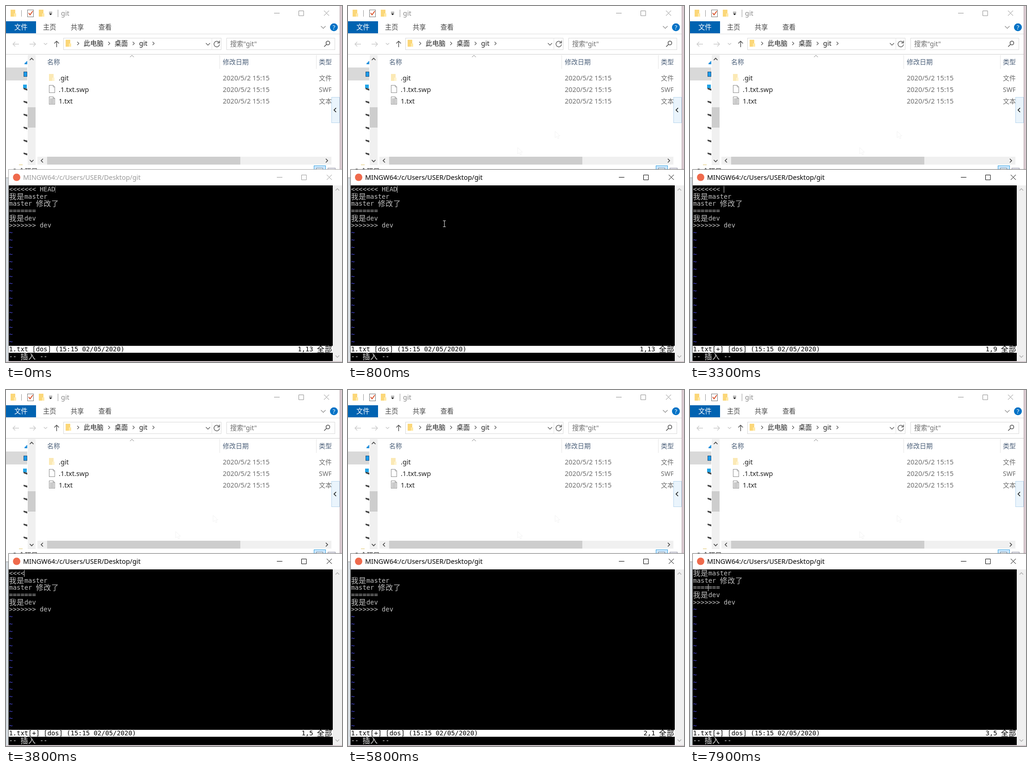
Write an HTML page with a canvas that moves like this. It is 727 px wide and 770 px high and loops after 8 s.

```html
<!DOCTYPE html>
<html lang="zh-CN">
<head>
<meta charset="utf-8">
<title>Resolving a merge conflict</title>
<style>
html, body { margin: 0; width: 100%; height: 100%; overflow: hidden; background: #fff; }
canvas { display: block; }
</style>
</head>
<body>
<canvas id="stage" width="727" height="770"></canvas>
<script>
const ctx = document.getElementById("stage").getContext("2d");
const LOOP = 8000;
const UI_FONT = "'Noto Sans', 'Noto Sans CJK SC', 'Noto Sans CJK', sans-serif";
const MONO_FONT = "'DejaVu Sans Mono', 'Noto Sans CJK SC', 'Noto Sans CJK', monospace";
const CELL_W = 8.33, CELL_H = 15.73, TERM_X = 6.4, TERM_Y = 388.8;

function rect(x, y, w, h, fill, border) {
  ctx.fillStyle = fill;
  ctx.fillRect(x, y, w, h);
  if (border) {
    ctx.strokeStyle = border;
    ctx.lineWidth = 1;
    ctx.strokeRect(x + .5, y + .5, w - 1, h - 1);
  }
}
function line(path, color, width = 1) {
  ctx.strokeStyle = color;
  ctx.lineWidth = width;
  ctx.stroke(new Path2D(path));
}
function shape(path, color) {
  ctx.fillStyle = color;
  ctx.fill(new Path2D(path));
}
function disc(x, y, r, color) {
  ctx.fillStyle = color;
  ctx.beginPath();
  ctx.arc(x, y, r, 0, 7);
  ctx.fill();
}
function text(str, x, middle, color, size = 14.5) {
  ctx.font = `${size}px ${UI_FONT}`;
  ctx.fillStyle = color;
  ctx.fillText(str, x, middle + 5);
}
function chevron(x, y, dir, size, color, width = 1.4) {
  const half = size / 2;
  const [dx, dy] = { up: [0, -1], down: [0, 1], left: [-1, 0], right: [1, 0] }[dir];
  const tipX = x + dx * half, tipY = y + dy * half;
  line(`M${tipX - dx * size - dy * size} ${tipY - dy * size - dx * size}L${tipX} ${tipY}` +
       `L${tipX - dx * size + dy * size} ${tipY - dy * size + dx * size}`, color, width);
}
function folder(x, y, light) {
  rect(x, y, 10, 15, light ? "#fbe9b5" : "#fbd779");
  rect(x + 7, y + 8, 5, 7, light ? "#fff3cf" : "#ffe9a6");
}
function page(x, y, lined) {
  rect(x, y, 13, 17, "#fff", "#8c8c8c");
  shape(`M${x + 9} ${y}h4v4z`, "#fff");
  line(`M${x + 9} ${y + .5}v3.5h3.5z`, "#8c8c8c");
  if (lined) for (let i = 4; i < 15; i += 2) line(`M${x + 2} ${y + i + .5}h9`, "#999");
}
function windowButtons(x, y, color) {
  line(`M${x} ${y + .5}h12M${x + 53.5} ${y - 4.5}h10.5v10.5h-10.5z`, color);
  line(`M${x + 108} ${y - 5}l11 11m0 -11l-11 11`, color);
}

function drawExplorerTop() {
  folder(10, 8);
  rect(33, 9, 1, 14, "#999");
  rect(46, 8, 14, 16, "#fff", "#777");
  line("M49 15l3 4l6 -8", "#d9522c", 2);
  folder(71, 8);
  rect(93, 13, 7, 1, "#333");
  shape("M93 16h7l-3.5 4z", "#222");
  rect(112, 8, 1, 16, "#999");
  text("git", 119, 16, "#8a8a8a");
  windowButtons(580, 15, "#8f8f8f");

  rect(0, 33, 65, 26, "#0063b1");
  text("文件", 18, 46, "#fff", 14.3);
  ["主页", "共享", "查看"].forEach((tab, i) => text(tab, 80 + i * 60, 46, "#444", 14.3));
  chevron(686.5, 46, "down", 5, "#888", 1.2);
  disc(709.5, 46, 8.5, "#0072c6");
  ctx.textAlign = "center";
  text("?", 709.5, 46, "#fff", 13);
  ctx.textAlign = "left";
  rect(0, 60, 722, 1, "#dcdcdc");

  line("M28 82.5h-13m5 -5l-5 5l5 5M51 82.5h13m-5 -5l5 5l-5 5", "#cbcbcb", 1.3);
  chevron(85.5, 82, "down", 3.5, "#c4c4c4", 1.2);
  line("M109.5 89v-13m-5 5l5 -5l5 5", "#555", 1.5);
  rect(124, 69, 342, 26, "#fff", "#d9d9d9");
  rect(445, 69, 1, 26, "#e2e2e2");
  folder(129, 73);
  for (const x of [156, 223, 276, 319]) chevron(x, 81, "right", 3.5, "#555", 1.2);
  text("此电脑", 168, 81, "#222", 14.3);
  text("桌面", 235, 81, "#222", 14.3);
  text("git", 288, 81, "#222");
  chevron(437, 82.5, "down", 4.5, "#666");
  line("M461 79a6 6 0 1 0 1 4M462 75v5h-5", "#666", 1.5);
  rect(477, 69, 235, 26, "#fff", "#d9d9d9");
  text("搜索\"git\"", 485, 82, "#707070", 14.3);
  line("M692.5 80a4 4 0 1 1 8 0a4 4 0 1 1 -8 0M693.5 83l-5 5", "#555", 1.6);
  rect(0, 104, 722, 1, "#cfcfcf");
}

function drawNavigation() {
  rect(0, 133, 46, 28, "#d9d9d9");
  shape("M40 126q0 -4 3 -4q1 -3 3 -3v7z", "#2490dc");
  rect(38, 142, 8, 11, "#1c9bea", "#24507a");
  rect(37, 170, 8, 8, "#22a5e8");
  for (const y of [177, 205, 233, 261, 289, 317])
    shape(`M38 ${y}l8 2v4l-8 -3z`, "#444");
  rect(28, 343, 8, 1, "#e0c66a");
  rect(47, 106, 17, 238, "#f0f0f0");
  rect(47, 219, 17, 44, "#cdcdcd");
  chevron(55.5, 115, "up", 4, "#444", 1.6);
  chevron(55.5, 335, "down", 4, "#444", 1.6);
}

function drawFileList() {
  chevron(272.5, 108.5, "up", 4, "#777", 1);
  rect(462, 106, 1, 30, "#e5e5e5");
  rect(671, 106, 1, 30, "#e5e5e5");
  text("名称", 89, 121, "#4c607a", 14);
  text("修改日期", 469, 121, "#4c607a", 14);
  folder(93, 147, true);
  page(93, 171);
  page(93, 196, true);

  ctx.save();
  ctx.beginPath();
  ctx.rect(0, 106, 704, 220);
  ctx.clip();
  text("类型", 677, 121, "#4c607a", 14);
  [[".git", "文件夹"], [".1.txt.swp", "SWP 文件"], ["1.txt", "文本文档"]].forEach(([name, type], i) => {
    const y = 156 + i * 25;
    text(name, 114, y, "#222");
    text("2020/5/2 15:15", 469, y, "#6d6d6d");
    text(type, 677, y, "#6d6d6d", 14);
  });
  ctx.restore();

  rect(704, 197, 18, 56, "#eaf4fc", "#b7d6ee");
  chevron(712, 225, "left", 4.5, "#111", 1.5);
  rect(68, 326, 636, 17, "#f0f0f0");
  rect(89, 326, 418, 17, "#cdcdcd");
  chevron(78, 334.5, "left", 4, "#444", 1.6);
  chevron(694, 334.5, "right", 4, "#444", 1.6);
  text("3 个项目", 15, 357, "#333", 14);
  rect(666, 345, 26, 20, "#cce8ff", "#3aa0dc");
  rect(671, 350, 15, 8, "#e8f2f8", "#789");
  rect(696, 350, 17, 8, "#e8e8ee", "#99a");
}

const arrowPath = (x, y) => `M${x} ${y}v14l3.5 -3l2.5 5l2.5 -1l-2.5 -5h4.5z`;

function drawDesktop() {
  rect(0, 0, 727, 770, "#fff");
  rect(722, 0, 1, 353, "#b3a0a8");
  rect(723, 0, 4, 353, "#dccdd3");
  rect(0, 371, 5, 399, "#d5dbe0");
  rect(0, 371, 5, 1, "#9a9a9a");
}

// Writes on the character grid; wide characters take two cells.
function write(str, row, col, color) {
  ctx.fillStyle = color;
  for (const ch of str) {
    const wide = ch > "\u2e80";
    ctx.font = `${wide ? 16 : 13.84}px ${MONO_FONT}`;
    ctx.fillText(ch, TERM_X + col * CELL_W, TERM_Y + row * CELL_H + (wide ? 13 : 12));
    col += wide ? 2 : 1;
  }
}

// [time, caret row, caret column, caret hidden]
const EDITS = [
  [0, 0, 12], [1300, 0, 12, 1], [1800, 0, 12], [2300, 0, 12, 1], [2800, 0, 12],
  [2900, 0, 11], [3000, 0, 10], [3100, 0, 9], [3300, 0, 8], [3400, 0, 7], [3500, 0, 6],
  [3600, 0, 5], [3800, 0, 4], [3900, 0, 3], [4100, 0, 2], [4200, 0, 1], [4400, 0, 0],
  [4900, 0, 0, 1], [5300, 1, 0], [5800, 1, 0, 1], [5900, 0, 0], [6400, 1, 0],
  [6800, 1, 0, 1], [7100, 2, 0], [7500, 2, 1], [7700, 2, 2], [7800, 2, 3], [7900, 2, 4]
];
// [time, x, y]
const POINTER = [
  [200, 448, 271], [300, 367, 306], [400, 300, 350], [500, 255, 402], [600, 228, 440],
  [700, 213, 462], [800, 208, 471], [1100, 207, 469], [1200, 206, 467], [1300, 205, 465.5]
];
const FOCUS_TIME = 800, TYPING_TIME = 2900, JOIN_TIME = 5900;
const latest = (list, t) => list.filter(entry => entry[0] <= t).pop();

function drawTerminal(t) {
  const focused = t >= FOCUS_TIME;
  const [, row, col, hidden] = latest(EDITS, t);

  rect(5, 353, 722, 417, "#fff");
  rect(5, 353, 722, 1, focused ? "#6b6b6b" : "#a5a5a5");
  rect(5, 353, 1, 416, focused ? "#6b6b6b" : "#a5a5a5");
  disc(23, 370.5, 8, "#ef6a4c");
  text("MINGW64:/c/Users/USER/Desktop/git", 37, 370.5, focused ? "#000" : "#999", 14.4);
  windowButtons(586, 370, focused ? "#000" : "#999");
  rect(6, 388, 701, 380, "#000");
  rect(707, 388, 20, 380, "#f0f0f0");
  chevron(717, 397, "up", 4, "#b0b0b0", 1.5);
  chevron(717, 758, "down", 4, "#b0b0b0", 1.5);
  rect(0, 768, 727, 2, "#d8cdd2");

  const lines = ["我是master", "master 修改了", "=======", "我是dev", ">>>>>>> dev"];
  if (t < JOIN_TIME) lines.unshift("<<<<<<< HEAD".slice(0, row ? 0 : col));
  for (let i = 0; i < 22; i++)
    i < lines.length ? write(lines[i], i, 0, "#bfbfbf") : write("~", i, 0, "#4646d8");

  rect(6, 735, 701, 15, "#fff");
  const position = `${row + 1},${col + 1}`;
  write(`1.txt${t >= TYPING_TIME ? "[+]" : ""} [dos] (15:15 02/05/2020)`, 22, 0, "#000");
  write(position, 22, 79 - position.length, "#000");
  write("全部", 22, 80, "#000");
  write("-- 插入 --", 23, 0, "#e6e6e6");

  if (!hidden)
    rect(Math.floor(TERM_X + col * CELL_W), Math.round(TERM_Y + row * CELL_H), 1, 15,
         focused ? "#d0d0d0" : "#777");
}

function drawPointer(t) {
  if (t < POINTER[0][0]) return;
  // Faint traces stay where the pointer crossed the file list.
  for (const [time, x, y] of POINTER.slice(0, 2))
    if (t >= time) line(arrowPath(x, y), "#f3f3f3");
  if (t >= TYPING_TIME) return;
  const [, x, y] = latest(POINTER, t);
  if (y < 388) {
    shape(arrowPath(x, y), "#fff");
    line(arrowPath(x, y), "#222");
  } else {
    const cx = Math.floor(x) + .5;
    line(`M${cx} ${y - 7}v14M${cx - 3} ${y - 6.5}h6M${cx - 3} ${y + 6.5}h6`, "#e8e8e8");
  }
}

function draw(now) {
  const t = now % LOOP;
  drawDesktop();
  drawExplorerTop();
  drawNavigation();
  drawFileList();
  drawTerminal(t);
  drawPointer(t);
}

const start = performance.now();
function tick() {
  draw(performance.now() - start);
  requestAnimationFrame(tick);
}
tick();
</script>
</body>
</html>
```
